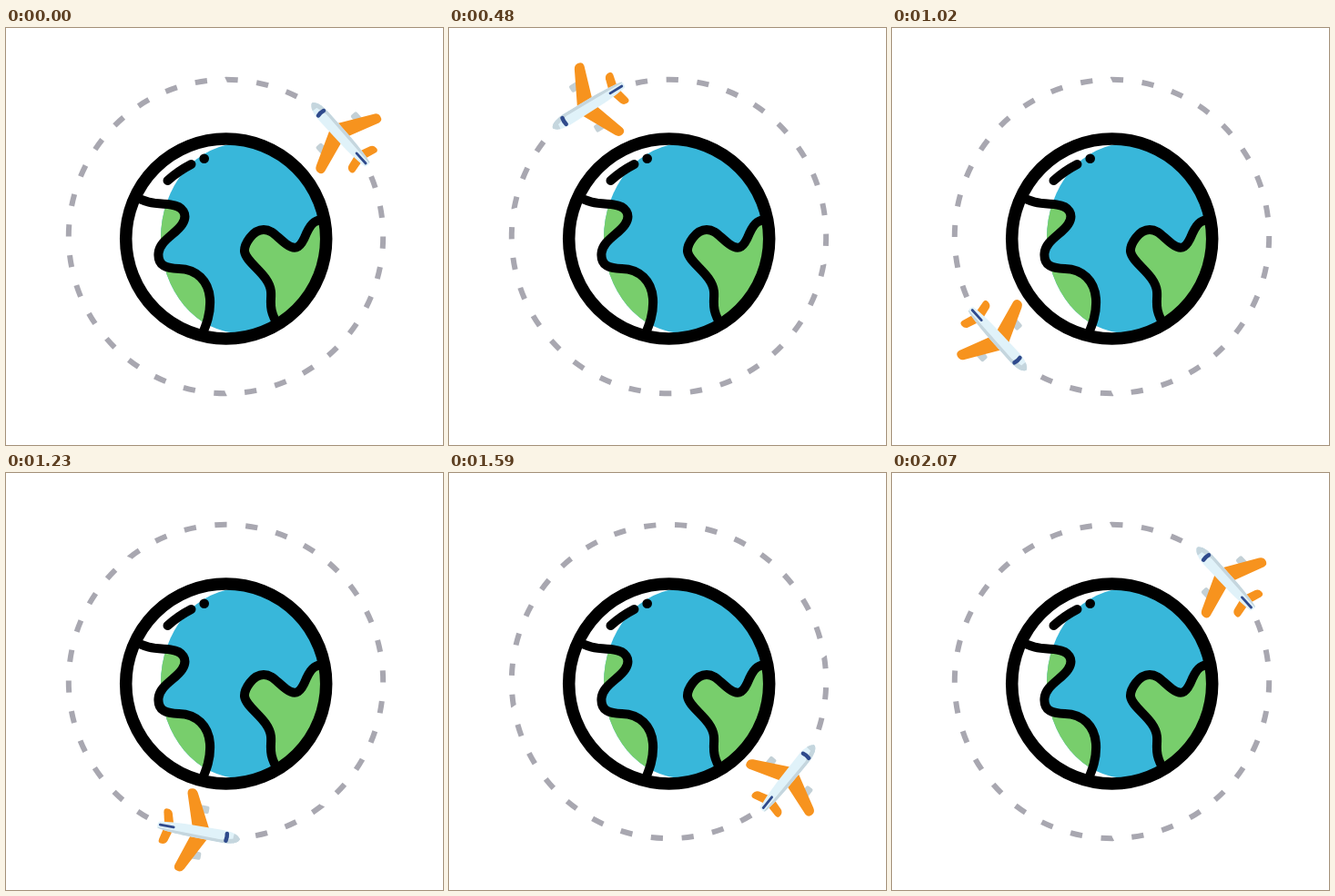
Write an HTML page that moves like this. It is 480 px wide and 459 px high and loops after 2100 ms.

```html
<!DOCTYPE html>
<html lang="en">
<head>
<meta charset="utf-8">
<title>Around the world</title>
<style>
  html, body { margin: 0; width: 100%; height: 100%; overflow: hidden; background: #fff; }
  svg { display: block; width: 100vw; height: 100vh; }
</style>
</head>
<body>
<svg viewBox="0 0 480 459" xmlns="http://www.w3.org/2000/svg">
  <defs>
    <clipPath id="globe"><circle cx="241.7" cy="232" r="110"/></clipPath>
    <clipPath id="lit"><ellipse cx="258" cy="231.5" rx="88" ry="104.5"/></clipPath>
    <clipPath id="hull"><path id="hullShape" d="M-46 0C-44-5-35-7-26-7L12-6.5C26-6 38-5 45-3.5Q47 0 45 3.5C38 5 26 6 12 6.5L-26 7C-35 7-44 5-46 0Z"/></clipPath>
    <g id="halfWing">
      <rect x="-7" y="-30" width="13" height="8.5" rx="2" fill="#c3d0d6"/>
      <path d="M-11-5L8.5-42.500Q11-47 15.5-46Q20.500-45 19.500-40L8-5Z" fill="#f7931e"/>
      <path d="M28-2L32-15.500Q33.500-19.500 38-19.500Q42.500-19.500 41.500-15L38.500-2Z" fill="#f7931e"/>
    </g>
  </defs>

  <g clip-path="url(#globe)">
    <g clip-path="url(#lit)">
      <rect x="120" y="110" width="245" height="245" fill="#38b7da"/>
      <path id="westLand" fill="#78ce6c"/>
      <path id="eastLand" fill="#78ce6c"/>
    </g>
    <g fill="none" stroke="#000" stroke-width="10" stroke-linejoin="round">
      <path id="westCoast"/>
      <path id="eastCoast"/>
    </g>
  </g>
  <circle cx="241.7" cy="232" r="110" fill="none" stroke="#000" stroke-width="13.5"/>
  <path d="M177.500 168Q189 157.500 203.500 150" fill="none" stroke="#000" stroke-width="10" stroke-linecap="round"/>
  <circle cx="217.7" cy="143.8" r="5.3"/>

  <g id="orbit">
    <circle r="172.7" fill="none" stroke="#a8a7b0" stroke-width="6" pathLength="32" stroke-dasharray=".39 .61"/>
    <g transform="rotate(48) translate(0 -168.5)">
      <use href="#halfWing"/>
      <use href="#halfWing" transform="scale(1 -1)"/>
      <use href="#hullShape" fill="#e0f2f9"/>
      <g clip-path="url(#hull)">
        <path d="M-48-9H48V-2.500L-26-3.500L-40 0L-48 2Z" fill="#c5d6de"/>
        <path d="M-48-9H-40Q-37 0-40 9H-48Z" fill="#c5d6de"/>
      </g>
      <path d="M-31-4Q-32 0-31 4" fill="none" stroke="#2f4a8c" stroke-width="4.500" stroke-linecap="round"/>
      <path d="M28 .5H43" stroke="#2f4a8c" stroke-width="2.800" stroke-linecap="round"/>
    </g>
  </g>
</svg>
<script>
  const $ = id => document.getElementById(id);

  const west = "M140 184C154 194 167 193 181 194.500C194 196 200.500 205 193.500 216C186.500 227 168.500 234 167.500 248C166.500 262 176 264.500 190 265C209 265.500 222.500 278 224 298C225 314 220.500 326 213.500 342";
  const east = "M354 212C340 209 335 215 330 226C324 241 319 246 308 238C297 230 293 222 283 222C271 222 261.500 238 262 246C264 259 289 271 291 290C292 301 287 309 300 329";
  $("westCoast").setAttribute("d", west);
  $("eastCoast").setAttribute("d", east);
  $("westLand").setAttribute("d", west + "L120 345V183Z");
  $("eastLand").setAttribute("d", east + "L365 328V211Z");

  const LOOP = 2100, STEP = 30;
  // Time in ms and degrees travelled; the flight is a little faster mid-way.
  const route = [[0, 0], [240, 40], [720, 119.4], [1020, 180.2], [1410, 250], [1740, 303.3], [2070, 360.4]];

  function travelled(ms) {
    const next = Math.max(1, route.findIndex(([time]) => time >= ms));
    const [t0, a0] = route[next - 1], [t1, a1] = route[next];
    return a0 + (a1 - a0) * (ms - t0) / (t1 - t0);
  }

  function draw(now) {
    const ms = Math.floor((now % LOOP) / STEP) * STEP;
    $("orbit").setAttribute("transform", `translate(241.5 229.5) rotate(${-travelled(ms)})`);
  }

  let start;
  function tick(now) {
    start ??= now;
    draw(now - start);
    requestAnimationFrame(tick);
  }
  draw(0);
  requestAnimationFrame(tick);
</script>
</body>
</html>
```
